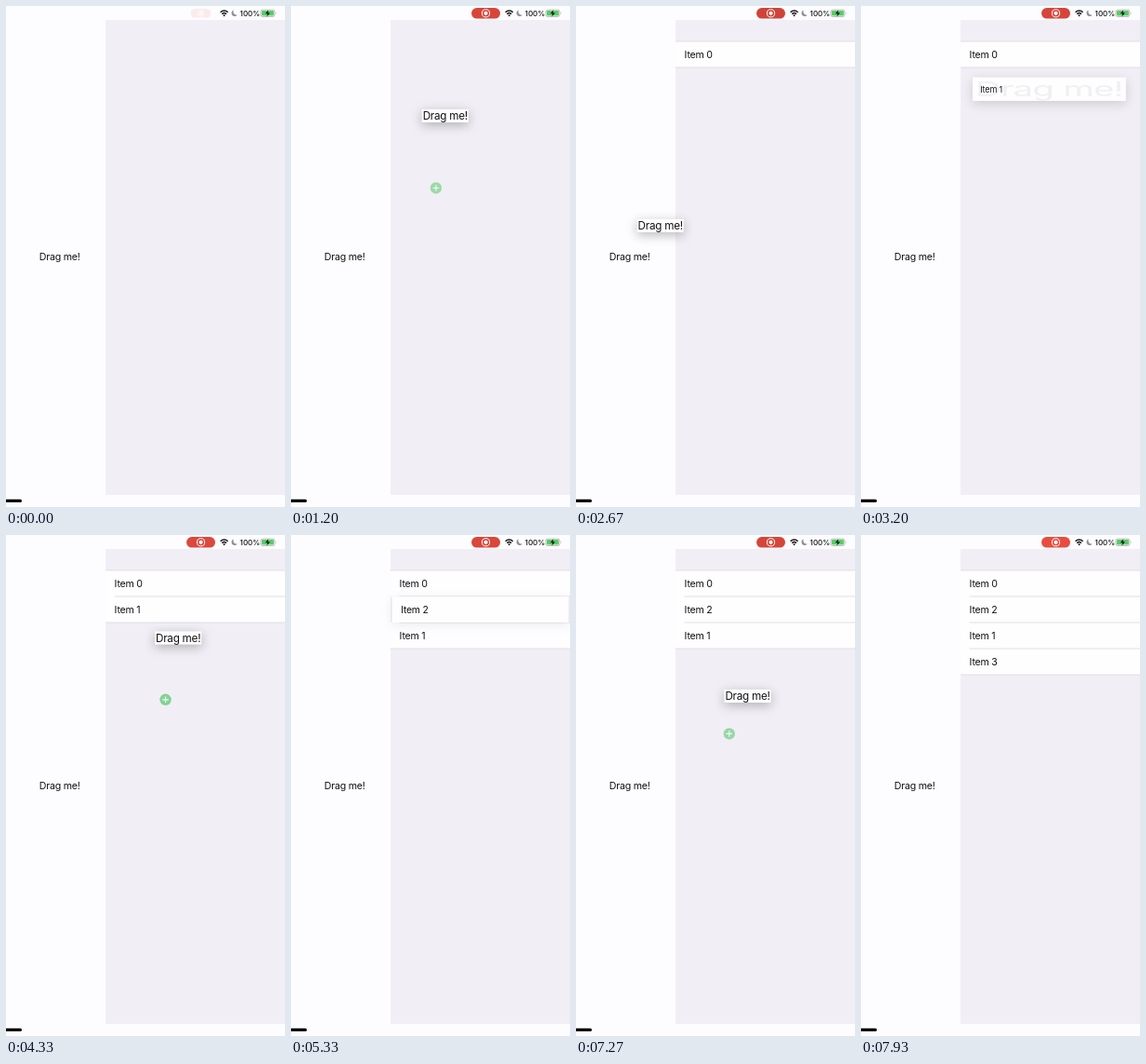
These frames come from a looping animation (300 by 538 pixels, 8 s). An HTML page:

```html
<!DOCTYPE html>
<html lang="en">
<head>
<meta charset="utf-8">
<title>Drag and drop list</title>
<style>
  html, body { margin: 0; width: 100%; height: 100%; overflow: hidden; background: #fdfcfe; }
  svg { display: block; width: 100%; height: 100%; }
  text { font: 10.6px Inter, Roboto, sans-serif; letter-spacing: -.02em; fill: #111; white-space: pre; }
  .pct { font-size: 8px; font-weight: 500; letter-spacing: 0; }
  .line { fill: #d9d8dd; }
</style>
</head>
<body>
<svg viewBox="0 0 300 538" preserveAspectRatio="xMidYMid meet">
  <rect width="300" height="538" fill="#fdfcfe"/>
  <rect x="107" y="15" width="193" height="510" fill="#f1eff5"/>
  <rect x="-10" y="529.7" width="27" height="3.3" rx="1.6" fill="#000"/>

  <g id="pill">
    <rect id="pillBack" x="194" y="2" width="31" height="11.6" rx="5.8"/>
    <circle cx="209.5" cy="7.8" r="4.1" fill="none" stroke="#fff" stroke-width="1"/>
    <circle cx="209.5" cy="7.8" r="2.1" fill="#fff"/>
  </g>
  <g fill="none" stroke="#111" stroke-width="1.5">
    <path d="M230.6 6.7a5.8 5.8 0 0 1 8 0"/>
    <path d="M232.3 8.6a3.4 3.4 0 0 1 4.6 0"/>
  </g>
  <path d="M233.2 9.9a2 2 0 0 1 2.8 0L234.6 11.3z" fill="#111"/>
  <path d="M244.7 4.6a3.3 3.3 0 1 0 3.9 4.8a3.4 3.4 0 0 1-3.9-4.8z" fill="#8d8d93"/>
  <text class="pct" x="251.6" y="10.6">100%</text>
  <rect x="273.9" y="4.1" width="15" height="7.4" rx="2" fill="#fdfcfe" stroke="#a5a5aa" stroke-width=".7"/>
  <rect x="274.9" y="5.1" width="13" height="5.4" rx="1.2" fill="#58cc68"/>
  <path d="M289.9 6.6q1.2 1.2 0 2.4z" fill="#a5a5aa"/>
  <path d="M282.2 4.2L278.8 8.2H281.2L280.4 11.4L284 7.3H281.5z" fill="#111"/>

  <text x="35.8" y="272.8">Drag me!</text>
  <g id="list"></g>
  <g id="preview">
    <rect id="card" fill="#fefdff"/>
    <text id="ghost" text-anchor="middle" y="3.8">Drag me!</text>
    <text id="title" x="-86.9" y="3.8"></text>
  </g>
  <g id="badge">
    <circle r="6.2" fill="#3fc25a"/>
    <path d="M-3.3 0H3.3M0-3.3V3.3" stroke="#fff" stroke-width="1.2"/>
  </g>
</svg>
<script>
const LOOP = 8000, ROW = 28, TOP = 38, LEFT = 107, WIDTH = 193;
const HOME = { x: 58.1, y: 269 };
const TOUCH = { x: 130, y: 247 };
const LIFT = 300, DRAG = 450, DROP = 409;

// lift / drag / drop are start times, x and y the hover point
const moves = [
  { name: 'Item 0', row: 0, lift: 585, drag: 885, drop: 1450, x: 195, y: 77 },
  { name: 'Item 1', row: 1, lift: 2200, drag: 2530, drop: 2986, x: 198, y: 127 },
  { name: 'Item 2', row: 1, lift: 3650, drag: 3992, drop: 4925, x: 208, y: 82, gap: 4450 },
  { name: 'Item 3', row: 3, lift: 6630, drag: 6950, drop: 7515, x: 216, y: 149 }
];

const $ = id => document.getElementById(id);
const clamp = v => Math.max(0, Math.min(1, v));
const mix = (a, b, p) => a + (b - a) * p;
const smooth = v => { v = clamp(v); return v * v * (3 - 2 * v); };
// share of the way still to go on a critically damped spring
const rest = ms => { const k = Math.max(0, ms) * .014; return (1 + k) * Math.exp(-k); };
const set = (el, attrs) => { for (const k in attrs) el.setAttribute(k, attrs[k]); };

function make(tag, attrs) {
  const el = document.createElementNS('http://www.w3.org/2000/svg', tag);
  set(el, attrs);
  return $('list').appendChild(el);
}

const rows = moves.map(m => {
  const back = make('rect', { x: LEFT, width: WIDTH, height: ROW, fill: '#fefdff' });
  const label = make('text', { x: 116.6 });
  label.textContent = m.name;
  return { back, label };
});
const lines = [0, 1, 2, 3, 4].map(() => make('rect', { class: 'line', height: .8 }));

function drawList(t) {
  const landed = moves.filter(m => t >= m.drop + DROP);
  const inserted = moves[2];
  const shift = smooth((t - inserted.gap) / 280);
  let bottom = TOP;

  moves.forEach((m, i) => {
    const { back, label } = rows[i];
    const shown = landed.includes(m);
    const y = TOP + ROW * (m.row + (i === 1 ? shift : 0));
    set(back, { y, visibility: shown ? 'visible' : 'hidden' });
    set(label, { y: y + 17.8, visibility: shown ? 'visible' : 'hidden' });
    if (shown) bottom = Math.max(bottom, y + ROW);
  });

  const count = Math.round((bottom - TOP) / ROW);
  lines.forEach((line, i) => {
    const edge = i === 0 || i === count;
    const x = edge ? LEFT : 116.6;
    const y = i === count ? bottom : TOP + ROW * i;
    set(line, { x, y: y - .4, width: 300 - x, visibility: count && i <= count ? 'visible' : 'hidden' });
  });
}

function drawPreview(t) {
  const m = moves.find(m => t >= m.lift && t < m.drop + DROP);
  set($('preview'), { visibility: m ? 'visible' : 'hidden' });
  set($('badge'), { visibility: m ? 'visible' : 'hidden' });
  if (!m) return;

  const up = smooth((t - m.lift) / LIFT);
  const go = smooth((t - m.drag) / DRAG);
  const r = rest(t - m.drop);
  const x = mix(LEFT + WIDTH / 2, mix(HOME.x, m.x, go), r);
  const y = mix(TOP + ROW * (m.row + .5), mix(HOME.y, m.y, go), r);
  const size = 1 + .1 * up;
  const w = mix(WIDTH, 45.5 * size, r), h = mix(ROW, 12.8 * size, r);
  const shade = .27 * up * Math.pow(r, .35);

  set($('preview'), { transform: `translate(${x} ${y})` });
  set($('card'), { x: -w / 2, y: -h / 2, width: w, height: h });
  $('card').style.filter = `drop-shadow(0 3px 6px rgba(0,0,0,${shade}))`;
  set($('ghost'), { transform: `scale(${w / 45.5} ${h / 12.8})`, opacity: Math.pow(r, 1.8) });
  $('title').textContent = m.name;
  set($('title'), { transform: `scale(${w / WIDTH} ${h / ROW})`, opacity: 1 - r * r });

  const since = t - m.drag - 240;
  const b = rest(since);
  const bx = mix(m.x + 25, TOUCH.x, b), by = mix(m.y - 9, TOUCH.y, b);
  set($('badge'), {
    transform: `translate(${bx} ${by})`,
    opacity: clamp(since / 160) * clamp(1 - (t - m.drop) / 100)
  });
}

function drawPill(t) {
  const grow = smooth((t + 45) / 260);
  const s = mix(.68, 1, grow);
  const glow = .5 + .5 * Math.cos((t - 1800) / 2043 * 2 * Math.PI);
  const tone = [[206, 233], [66, 77], [57, 62]].map(([a, b]) => mix(a, b, glow));
  set($('pill'), {
    transform: `translate(209.5 7.8) scale(${s} ${mix(.8, 1, grow)}) translate(-209.5 -7.8)`,
    opacity: grow
  });
  set($('pillBack'), { fill: `rgb(${tone.map(Math.round)})` });
}

function draw(t) {
  drawPill(t);
  drawList(t);
  drawPreview(t);
}

const start = performance.now();
function tick() {
  draw((performance.now() - start) % LOOP);
  requestAnimationFrame(tick);
}
draw(0);
requestAnimationFrame(tick);
</script>
</body>
</html>
```
